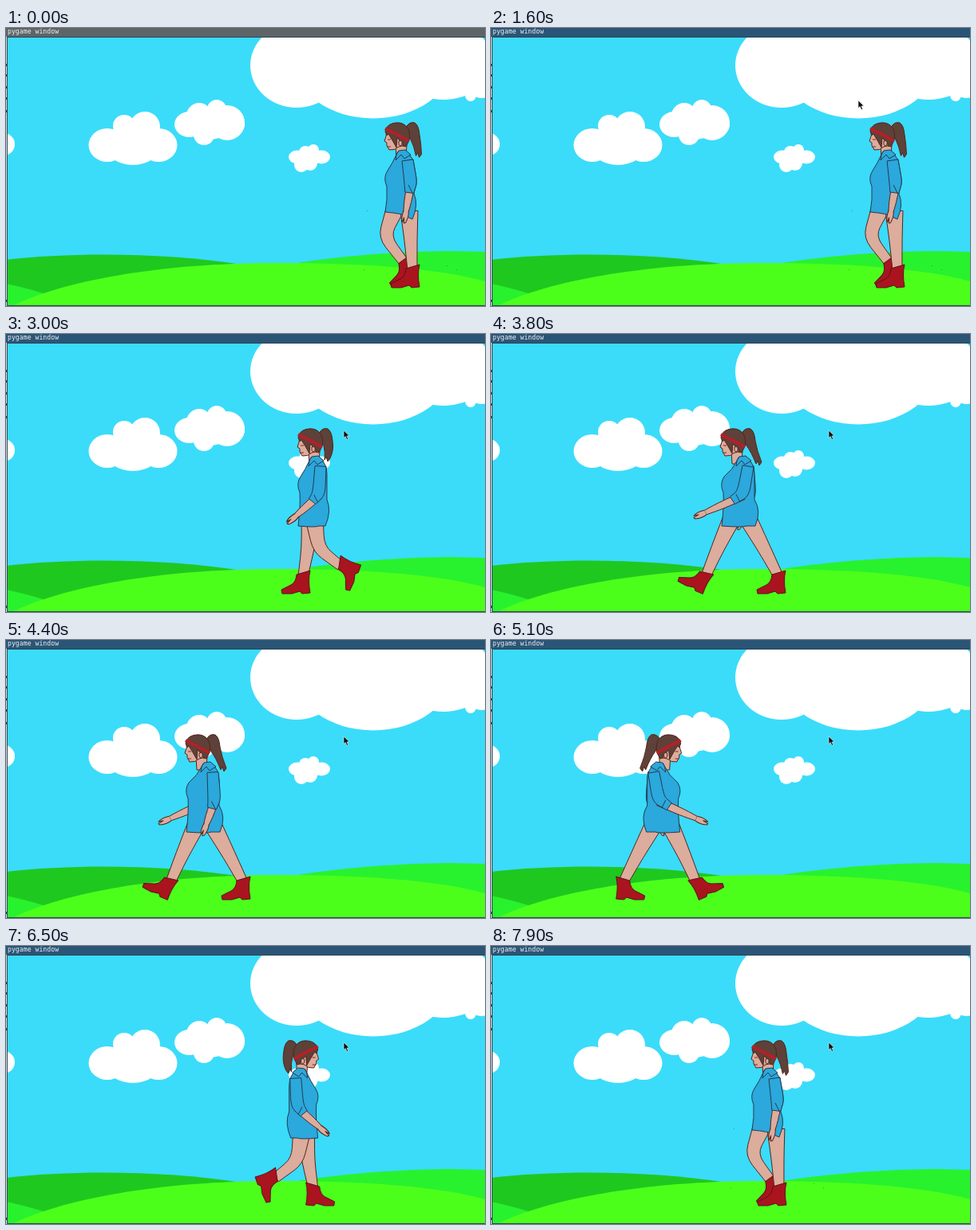
An HTML page with a canvas that plays this animation: 600 by 349 pixels, repeating every 8 s.

```html
<!DOCTYPE html>
<html lang="en">
<head>
<meta charset="utf-8">
<title>pygame window</title>
<style>
html, body { margin: 0; width: 100%; height: 100%; overflow: hidden; background: #3adcfa; }
canvas { display: block; width: 100vw; height: 100vh; }
</style>
</head>
<body>
<canvas id="stage" width="600" height="349"></canvas>
<script>
const ctx = document.getElementById('stage').getContext('2d');
const LOOP = 8000, STEP = 100, SPEED = 105, CYCLE = 1.1;
const SKIN = '#dcac9c', SHIRT = '#2ba8dc', HAIR = '#5e4138', RED = '#a9141f';
const INK = '#54241a', SEAM = '#283a4c', BORDER = '#2c4654';
const BOOT = 'M-8,1 L9,-4 Q6,8 9,24 L-1,25 L-4,22 L-14,25 L-26,25 L-27,20 L-15,14 Q-9,11 -8,1Z';

const mix = (a, b, k) => a + (b - a) * k;
const between = (p, q, k) => [mix(p[0], q[0], k), mix(p[1], q[1], k)];
const clamp = k => Math.max(0, Math.min(1, k));

function paint(path, fill, line = INK, width = 1) {
  const p = new Path2D(path);
  if (fill) { ctx.fillStyle = fill; ctx.fill(p); }
  if (line) { ctx.strokeStyle = line; ctx.lineWidth = width; ctx.stroke(p); }
}

function rect(color, x, y, w, h) {
  ctx.fillStyle = color;
  ctx.fillRect(x, y, w, h);
}

function placed(x, y, angle, body) {
  ctx.save();
  ctx.translate(x, y);
  ctx.rotate(angle);
  body();
  ctx.restore();
}

function puff(x, y, rx, ry = rx) {
  ctx.fillStyle = '#fff';
  ctx.beginPath();
  ctx.ellipse(x, y, rx, ry, 0, 0, 7);
  ctx.fill();
}

// A core with a lobe on either side, plus round puffs [x, y, r]
function cloud(x, y, w, h, ...puffs) {
  puff(x, y, w * 0.62, h);
  for (const s of [-1, 1]) puff(x + s * w * 0.58, y, w * 0.42, h * 0.84);
  puffs.forEach(p => puff(...p));
}

// Tapered limb through three joints, with a rounded bend at the middle one
function limb(a, b, c, widths, fill, line) {
  const edge = s => [[a, a, b], [b, a, c], [c, b, c]].map(([p, from, to], i) => {
    const dx = to[0] - from[0], dy = to[1] - from[1];
    const r = s * widths[i] / 2 / Math.hypot(dx, dy);
    return [p[0] - dy * r, p[1] + dx * r];
  });
  const bend = ([p, q, r]) => `${p} L${between(p, q, 0.65)} Q${q} ${between(q, r, 0.35)} L${r}`;
  paint(`M${bend(edge(1))} L${bend(edge(-1).reverse())}Z`, fill, line);
}

function leg({ hip, knee, ankle, pitch }) {
  limb(hip, knee, [ankle[0], ankle[1] + 3], [22, 16, 12], SKIN);
  placed(...ankle, pitch * Math.PI / 180, () => paint(BOOT, RED, '#5c1218'));
}

function arm({ elbow, hand }) {
  const at = k => between(elbow, hand, k);
  limb(elbow, at(0.55), at(0.88), [10, 9, 6], SKIN);
  const turn = Math.atan2(hand[1] - elbow[1], hand[0] - elbow[0]);
  placed(...at(0.98), turn, () => paint('M-6,-3 Q0,-5 9,-2 L10,0 L3,1 L9,2 Q4,5 -6,3', SKIN));
  limb([8, 166], [elbow[0], elbow[1] - 3], at(0.25), [14, 16, 11], SHIRT, SEAM);
  const c = at(0.13);
  paint(`M${c[0] - 2},${c[1] - 5} L${c[0] + 3},${c[1] + 5}`, null, SEAM);
}

function head(x, sway) {
  placed(x, 0, 0, () => {
    const tx = 38 + 11 * sway, ty = 160 + 5 * sway;
    paint(`M27,125 Q31,117 38,119 Q43,122 44,134 Q46,146 ${tx + 3},${ty - 4} L${tx},${ty} L${tx - 2},${ty - 6} L${tx - 4},${ty - 2} Q${35 + 4 * sway},148 33,140 Q29,134 27,125Z`, HAIR);
    paint('M14,148 L15,163 L27,163 L28,146Z', SKIN);
    paint('M3,129 L2,136 L0,142 L3,144 L3,148 L4,149 L6,153 Q13,154 18,149 L27,147 L27,130Z', SKIN);
    paint('M1,130 Q2,122 11,119.5 Q22,117 28,124 Q33,130 31,141 L27,149 L23,148 Q23,142 20,142 L16,138 L15,150 L10,141 L5,133 L3,135Z', HAIR);
    paint('M18,142 Q23,140 22,146 Q20,150 18,146Z', SKIN);
    paint('M1,126 Q8,130 15,133 Q24,138 31,142', null, '#b51f28', 4);
    paint('M4,140 L8,140 M3,149 L8,149', null, '#8c2424', 1.2);
  });
}

function shirt(spread, front, back) {
  const f = -20 - 5 * spread, b = 20 + 3 * spread;
  paint(`M-6,159 Q-11,170 ${f + 3},179 Q${f - 3},188 ${f + 2},199 Q${f + 3},216 ${f},${front} Q2,${front + 2} 6,${mix(front, back, 0.6)} L${b - 6},${back} Q${b + 2},222 16,208 L16,176 Q16,162 6,155 L-4,155Z`, SHIRT, SEAM);
  paint('M-6,159 L-3,154 L5,153 L12,159 L4,164 L0,159 L-7,166Z', SHIRT, SEAM);
}

// Joints of one leg at a stride angle: 0 is the heel strike, pi the push off
function stride(a) {
  const c = Math.cos(a), s = Math.sin(a), lift = Math.max(0, -s);
  const knee = [-1 - 29.5 * c - 7 * s, 270];
  return {
    hip: [knee[0] * 0.35 - 2, 232],
    knee,
    ankle: [5 - 45.5 * c - 23.5 * s - 4.5 * Math.cos(2 * a), 301 - 13 * lift],
    pitch: 29 * Math.max(0, c) ** 2 - 65 * lift ** 2
  };
}

const swing = k => ({ elbow: [6 - 4 * k, 203], hand: [-27 - 25 * k, 232 - 5 * k] });

function walkPose(a) {
  const k = Math.cos(a), spread = Math.abs(k);
  return {
    legs: [stride(a), stride(a + Math.PI)], far: swing(-k), near: swing(k),
    spread, sway: spread, front: 241, back: 241
  };
}

const rest = { elbow: [12, 197], hand: [5, 236] };
const STAND = {
  legs: [
    { hip: [-8, 228], knee: [-21, 262], ankle: [4, 292], pitch: -20 },
    { hip: [10, 230], knee: [12, 266], ankle: [14, 301], pitch: 0 }
  ],
  far: rest, near: rest, spread: 0, sway: 0.5, front: 231, back: 240, idle: true
};

function girl(x, face, pose) {
  ctx.save();
  ctx.translate(x, 0);
  ctx.scale(face, 1);
  ctx.lineJoin = 'round';
  arm(pose.far);
  pose.legs.forEach(leg);
  head(-21 - 6 * pose.spread, pose.sway);
  shirt(pose.spread, pose.front, pose.back);
  arm(pose.near);
  if (pose.idle) {
    for (const [px, py] of [[-43, 229], [-47, 303], [57, 298], [69, 303]]) rect('#3a4a3080', px, py, 1, 1);
  }
  ctx.restore();
}

// Walks left, then right, then left again, and stops
const START = 2, TURN = 4.88, BACK = 7.05, STOP = 7.75;
function drawGirl(t) {
  const right = Math.min(t, BACK) - TURN;
  const moved = right < 0 ? clamp((t - START) / 9) * 9 : TURN - START - right + Math.max(0, Math.min(t, STOP) - BACK);
  const x = 497 - SPEED * moved;
  if (t < START || t >= STOP) return girl(x - 2, 1, STAND);
  const face = t >= TURN && t < BACK ? -1 : 1;
  const contact = t < TURN ? 3.8 : 5.1;
  const a = Math.round((t - contact) / CYCLE * 8) * Math.PI / 4;
  girl(x + face * 6 * Math.cos(2 * a), face, walkPose(a));
}

function drawScene() {
  rect('#3adcfa', 0, 0, 600, 349);
  puff(-3, 146, 14);
  cloud(159, 147, 55.5, 25, [148, 123, 14], [174, 124, 19]);
  cloud(255, 121, 44, 19, [242, 110, 16], [264, 102, 12], [248, 134, 13], [277, 119, 22]);
  cloud(380, 162, 26, 10, [375, 156, 8], [385, 153, 7], [370, 172, 9], [381, 170, 9]);
  puff(364, 47, 58, 53);
  puff(460, 40, 100, 73.5);
  puff(548, 42, 62, 48);
  puff(582, 84, 7, 8);
  puff(596, 77, 14, 11);
  paint('M0,291 C80,281.5 200,281.5 295,297 V349 H0Z', '#1fc81f', null);
  paint('M360,296 C430,284 510,280 560,280 L600,281 V349 H360Z', '#28f22e', null);
  paint('M0,321 Q24,326 50,334 V349 H0Z', '#28f22e', null);
  paint('M8,349 C70,318 190,295 340,295 C440,295 540,301 600,318 V349Z', '#4cff1b', null);
}

function drawWindow(active) {
  rect('#d4e2e4', 0, 11, 1, 338);
  for (const y of [45, 58, 73, 87, 103, 341]) rect(BORDER, 0, y, 1, 3);
  rect(BORDER, 1, 11, 1, 338);
  rect(BORDER, 1, 348, 599, 1);
  rect(active ? '#2b5577' : '#5f6467', 0, 0, 600, 11);
  rect(BORDER, 1, 11, 599, 1);
  ctx.fillStyle = '#f0f0f0';
  ctx.font = '8.2px "DejaVu Sans Mono", monospace';
  ctx.fillText('pygame window', 2, 7);
}

function drawCursor(t) {
  const entry = between([520, 12], [460, 91], clamp((t - 1) / 0.5));
  const spot = between(entry, [423, 121], clamp((t - 1.6) / 0.4));
  placed(...spot, 0, () => paint('M0,0 V9.5 L2.2,7.6 L4,11.5 L5.6,10.8 L4,7 L7,6.8Z', '#101010', '#e8f4f8', 0.6));
}

function draw(now) {
  const t = Math.floor(now % LOOP / STEP) * STEP / 1000;
  const active = t >= 1;
  drawScene();
  drawGirl(t);
  drawWindow(active);
  if (active) drawCursor(t);
  requestAnimationFrame(draw);
}
draw(0);
</script>
</body>
</html>
```
